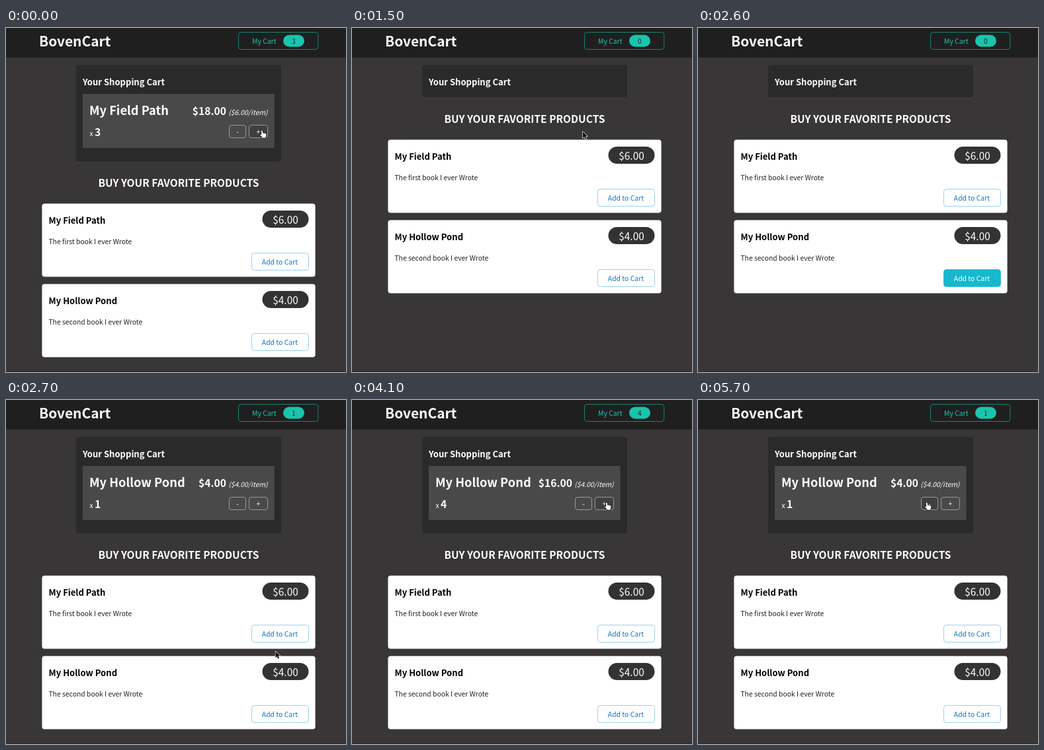
These frames come from a looping animation (514x522 px, 5.9 s). An HTML page with a canvas:

```html
<!DOCTYPE html>
<html lang="en">
<head>
<meta charset="utf-8">
<title>Shopping cart</title>
<style>
html, body { margin: 0; width: 100%; height: 100%; overflow: hidden; background: #383637; }
canvas { display: block; width: 514px; height: 522px; }
</style>
</head>
<body>
<canvas id="stage"></canvas>
<script>
const W = 514, H = 522, LOOP = 5900, STEP = 100;
const FAMILY = '"Noto Sans CJK JP", "Noto Sans CJK SC", "Noto Sans", sans-serif';
const SMALL = 11.6, MEDIUM = 14.375, LARGE = 17.25;
const canvas = document.getElementById('stage');
const ctx = canvas.getContext('2d');
const dpr = window.devicePixelRatio || 1;
canvas.width = W * dpr;
canvas.height = H * dpr;

const products = [
  { name: 'My Field Path', about: 'The first book I ever Wrote', price: 6 },
  { name: 'My Hollow Pond', about: 'The second book I ever Wrote', price: 4 }
];

// [time, quantity in the cart]
const quantities = [
  [0, 3], [900, 2], [1100, 1], [1500, 0], [2700, 1], [3600, 2],
  [3800, 3], [4100, 4], [4600, 3], [4900, 2], [5300, 1]
];

// [first step, last step, x, y] of each pointer move
const startPoint = [387, 156];
const moves = [
  [400, 700, 346, 156], [1500, 1500, 349, 157], [1700, 2200, 407.5, 364],
  [2300, 2400, 407.5, 381], [3000, 3500, 385, 156], [4200, 4400, 346, 156]
];
const hiddenAt = [1400, 2600];

const money = v => '$' + v.toFixed(2);
const inside = (p, b) => p.x >= b.x && p.x <= b.x + b.w && p.y >= b.y && p.y <= b.y + b.h;

// Size correction that gives the digits a fixed share of the em
function digitScale(weight, share) {
  ctx.font = `${weight} 100px ${FAMILY}`;
  return share * 100 / ctx.measureText('0').width;
}
const scale = { 400: digitScale(400, 0.497), 700: digitScale(700, 0.536) };

function text(str, x, y, size, color, { weight = 400, align = 'left', style = 'normal' } = {}) {
  ctx.font = `${style} ${weight} ${(size * scale[weight]).toFixed(2)}px ${FAMILY}`;
  ctx.textAlign = align;
  ctx.fillStyle = color;
  ctx.fillText(str, x, y);
}

function box(b, r, fill, stroke) {
  const o = stroke ? 0.5 : 0;
  ctx.beginPath();
  ctx.roundRect(b.x + o, b.y + o, b.w - 2 * o, b.h - 2 * o, r);
  if (fill) {
    ctx.fillStyle = fill;
    ctx.fill();
  }
  if (stroke) {
    ctx.strokeStyle = stroke;
    ctx.lineWidth = 0.75;
    ctx.stroke();
  }
}

const rect = (x, y, w, h) => ({ x, y, w, h });
const minus = rect(337, 147, 26, 20);
const plus = rect(367, 147, 29, 20);
const addButton = top => rect(371, top + 75, 87, 27);

function pointerAt(t) {
  let [x, y] = startPoint;
  for (const [from, to, tx, ty] of moves) {
    if (t < from) break;
    const p = Math.min(1, (t - from + STEP) / (to - from + STEP));
    const e = p * p * (3 - 2 * p);
    x += (tx - x) * e;
    y += (ty - y) * e;
  }
  return { x, y };
}

function drawHeader(count) {
  ctx.fillStyle = '#1f1f1f';
  ctx.fillRect(0, 0, W, 44.6);
  text('BovenCart', 50, 28, 23, '#fff', { weight: 700 });
  box(rect(351, 6, 121.3, 27), 4, null, '#17a491');
  text('My Cart', 372, 24, SMALL, '#1cc9b0');
  box(rect(419, 10.5, 32, 18), 9, '#19c5ad');
  text(count, 435, 24, SMALL, '#222', { align: 'center' });
}

function drawCart(item, count, pointer) {
  box(rect(106, 56, 310, count ? 146.5 : 49), 4, '#2a2a2a');
  text('Your Shopping Cart', 116, 86.5, MEDIUM, '#fff', { weight: 700 });
  if (!count) return;
  box(rect(116, 100, 289.6, 82), 0, '#494949');
  text(item.name, 126, 131.5, 20.1, '#fff', { weight: 700 });
  text(money(item.price * count), 333, 132, LARGE, '#fff', { weight: 700, align: 'right' });
  text(`(${money(item.price)}/item)`, 395.5, 132, SMALL, '#fff', { style: 'italic', align: 'right' });
  text('x', 126.5, 164, SMALL, '#fff');
  text(count, 134, 164, LARGE, '#fff', { weight: 700 });
  for (const [b, sign] of [[minus, '-'], [plus, '+']]) {
    box(b, 3.5, inside(pointer, b) ? '#3f3f3f' : null, '#b4b4b4');
    text(sign, b.x + b.w / 2, 161, SMALL, '#fff', { align: 'center' });
  }
}

function drawProduct(item, top, pointer) {
  const button = addButton(top);
  const hover = inside(pointer, button);
  box(rect(54.4, top + 0.4, 413.2, 111.2), 4, '#fff');
  text(item.name, 64.6, top + 31, MEDIUM, '#000', { weight: 700 });
  text(item.about, 64.4, top + 62, SMALL, '#222');
  box(rect(387.5, top + 11, 70, 26), 13, '#343233');
  text(money(item.price), 422.5, top + 31, LARGE, '#fff', { align: 'center' });
  box(button, 4, hover ? '#17b8cd' : null, hover ? '#17b8cd' : '#7fbfe6');
  text('Add to Cart', 414, top + 93, SMALL, hover ? '#fff' : '#0c78bd', { align: 'center' });
}

const arrow = new Path2D('M0 .5V10L2.2 8L3.8 11.3L5.4 10.6L4 7.3H6.9Z');
const hand = new Path2D(
  'M-1.2 .5C-1.2 -.7 .7 -.7 .8 .5L1.2 3.8C1.7 3 2.8 3.1 3 3.9C3.7 3.3 4.6 3.5 4.7 4.4' +
  'C5.5 4 6.3 4.4 6.3 5.3V7.5C6.3 8.8 5.4 9.4 5.3 10.7H.5C.2 9.2 -1.5 8 -2.7 6.5' +
  'C-3.1 5.6 -2.1 5 -1.2 5.7L-.6 6.4Z'
);

function drawPointer(p, overButton) {
  ctx.save();
  ctx.translate(p.x, p.y);
  ctx.lineJoin = 'round';
  ctx.lineWidth = 1.5;
  ctx.strokeStyle = overButton ? '#111' : '#ddd';
  ctx.fillStyle = overButton ? '#fff' : '#111';
  const shape = overButton ? hand : arrow;
  ctx.stroke(shape);
  ctx.fill(shape);
  ctx.restore();
}

function draw(now) {
  const t = Math.floor((now % LOOP) / STEP) * STEP;
  const count = quantities.filter(([at]) => at <= t).pop()[1];
  const pointer = pointerAt(t);
  const item = products[t < 1500 ? 0 : 1];
  const shift = count ? 97 : 0;
  const tops = [169 + shift, 291 + shift];
  const buttons = tops.map(addButton).concat(count ? [minus, plus] : []);

  ctx.setTransform(dpr, 0, 0, dpr, 0, 0);
  ctx.fillStyle = '#383637';
  ctx.fillRect(0, 0, W, H);
  ctx.fillStyle = '#2b2326';
  ctx.fillRect(0, H - 1, W, 1);

  drawHeader(count);
  drawCart(item, count, pointer);
  text('BUY YOUR FAVORITE PRODUCTS', 261, 144 + shift, 17.1, '#fff',
    { weight: 700, align: 'center' });
  products.forEach((p, i) => drawProduct(p, tops[i], pointer));
  if (!hiddenAt.includes(t)) drawPointer(pointer, buttons.some(b => inside(pointer, b)));
}

let begin;
function tick(now) {
  begin ??= now;
  draw(Math.max(0, now - begin));
  requestAnimationFrame(tick);
}
draw(0);
requestAnimationFrame(tick);
</script>
</body>
</html>
```
